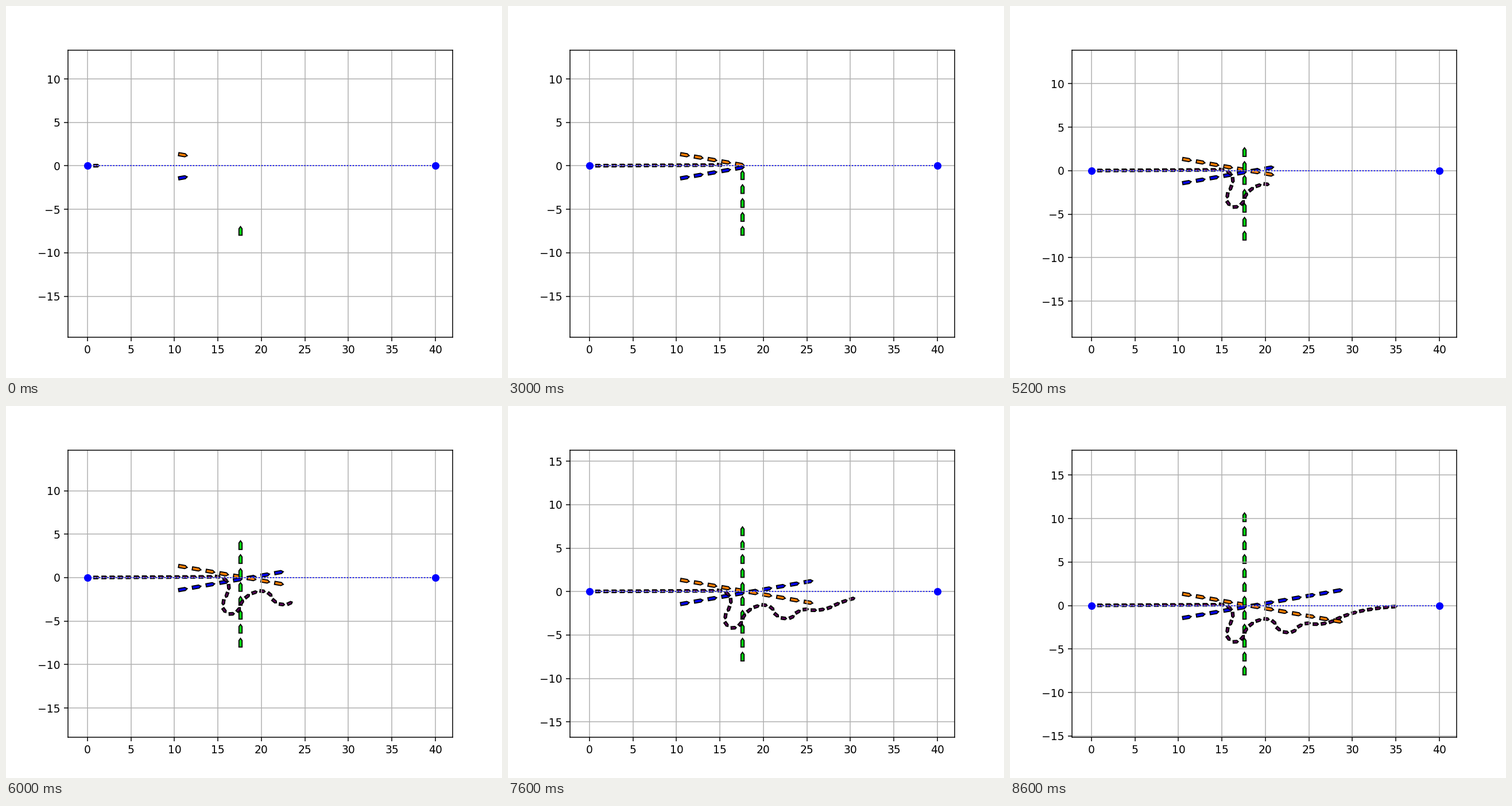
Write a matplotlib script that moves like this. It is 864 px wide and 648 px high and loops after 8800 ms.

```python
import numpy as np
import matplotlib.pyplot as plt
from matplotlib.animation import FuncAnimation
from matplotlib.patches import Polygon

FRAMES, INTERVAL = 44, 200
X_MIN, X_SPAN = -2.24, 44.21
LEFT, RIGHT, BOTTOM, TOP = 0.125, 0.9, 0.109, 0.8808
Y_SPAN = X_SPAN * 4.8 * (TOP - BOTTOM) / (6.4 * (RIGHT - LEFT))
LOWEST, HIGHEST = -7.98, 1.53  # vertical extent at the start
OWN_STEP, TRAFFIC_STEP = 0.931, 1.603

fig, ax = plt.subplots(figsize=(6.4, 4.8), dpi=135)
fig.subplots_adjust(left=LEFT, right=RIGHT, bottom=BOTTOM, top=TOP)
ax.set_xlim(X_MIN, X_MIN + X_SPAN)
ax.grid(True)
ax.plot([0, 40], [0, 0], "b:", lw=1)
ax.plot([0, 40], [0, 0], "bo")


def direction(angle):
    return np.stack([np.cos(angle), np.sin(angle)], axis=-1)


def add_boat(center, heading, length, width, color):
    """Pentagon hull pointing along the heading (radians)."""
    along = np.array([-0.5, 0.25, 0.5, 0.25, -0.5]) * length
    across = np.array([-0.5, -0.5, 0, 0.5, 0.5]) * width
    points = (center + np.outer(along, direction(heading))
              + np.outer(across, direction(heading + np.pi / 2)))
    return ax.add_patch(Polygon(points, fc=color, ec="black", lw=1, zorder=1))


def own_path():
    """Constant speed, steered by a few (step, course in degrees) keys."""
    keys = [(0, 0.3), (14.5, 0.3), (16, -65), (17, -105), (18, -114),
            (19, -83), (21, 32), (22, 66), (25, 9), (27, -56),
            (30, 41), (32, -6), (35, 25), (39, 10), (43, 3)]
    course = np.radians(np.interp(np.arange(FRAMES), *zip(*keys)))
    moves = OWN_STEP * direction(course[:-1])
    return np.vstack([[0, 0], np.cumsum(moves, axis=0)]) + (1.03, 0.02)


# Crossing traffic: start position, course in degrees, colour
TRAFFIC = [((17.6, -7.48), 90, "#00e60f"),
           ((10.98, -1.35), 10, "#0000ff"),
           ((10.98, 1.26), -10, "#ff7f00")]


def traffic_count(frame):
    return (frame + 1) // 4


path = own_path()
dx, dy = np.gradient(path, axis=0).T
headings = np.arctan2(dy, dx)

boats = []  # (frame of appearance, patch)
for n in range(FRAMES):
    k = traffic_count(n)
    if n == 0 or k > traffic_count(n - 1):
        for start, degrees, color in TRAFFIC:
            angle = np.radians(degrees)
            center = start + k * TRAFFIC_STEP * direction(angle)
            boats.append((n, add_boat(center, angle, 1.0, 0.36, color)))
    boats.append((n, add_boat(path[n], headings[n], 0.6, 0.3, "#5a005a")))


def update(frame):
    for born, boat in boats:
        boat.set_visible(born <= frame)
    # The view stays centred on everything drawn so far
    green_tip = LOWEST + 1 + TRAFFIC_STEP * traffic_count(frame)
    middle = (max(HIGHEST, green_tip) + LOWEST) / 2
    ax.set_ylim(middle - Y_SPAN / 2, middle + Y_SPAN / 2)
    return []


anim = FuncAnimation(fig, update, frames=FRAMES, interval=INTERVAL,
                     repeat=True, repeat_delay=0, blit=False)
plt.show()
```
